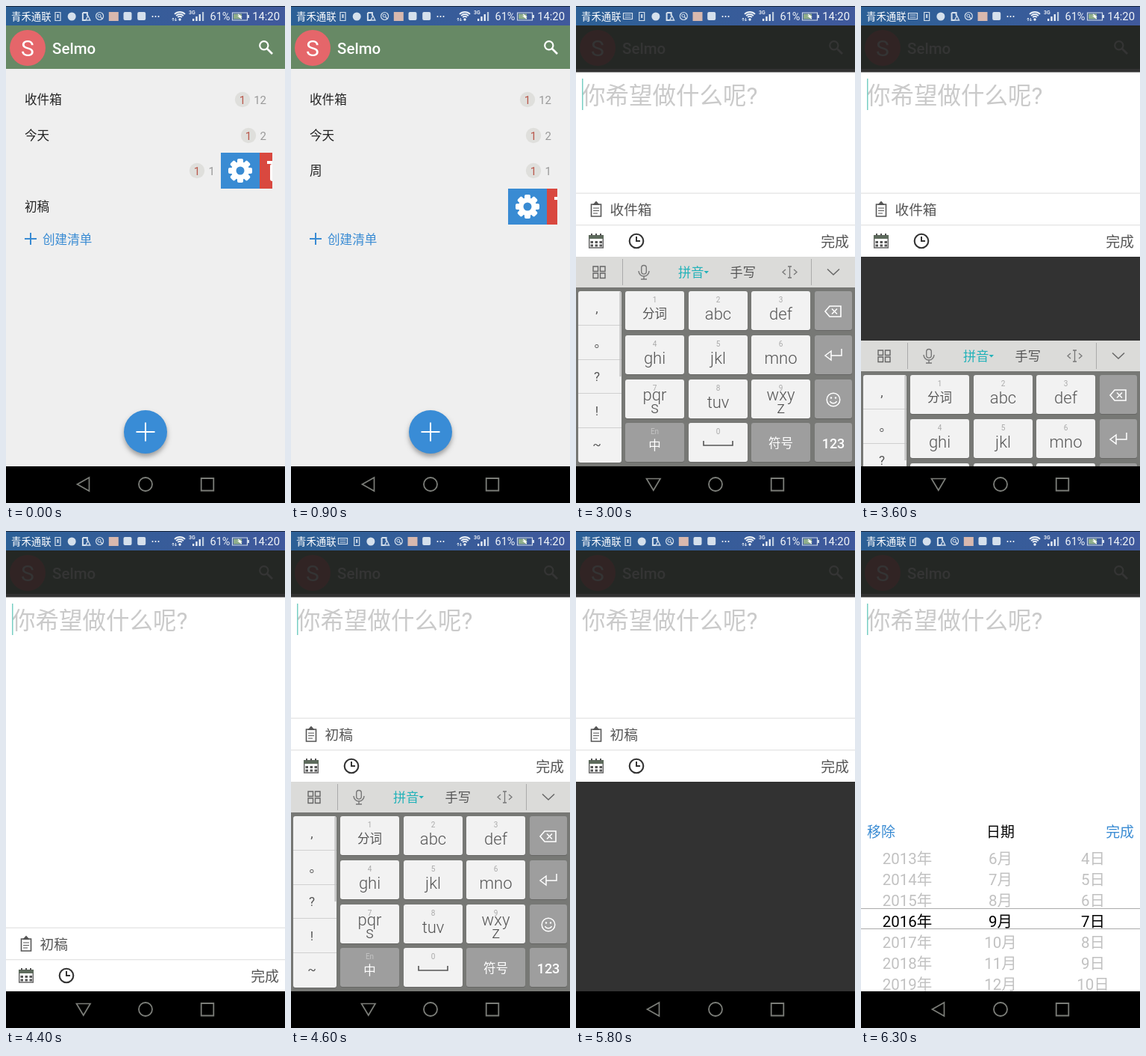
An HTML page with a canvas that plays this animation: 374 px wide and 664 px high, repeating every 6.4 s.

```html
<!DOCTYPE html>
<html lang="zh-CN">
<head>
<meta charset="utf-8">
<style>
html, body { margin: 0; width: 100%; height: 100%; overflow: hidden; background: #000; }
canvas { display: block; }
</style>
</head>
<body>
<canvas id="stage" width="374" height="664"></canvas>
<script>
const c = document.getElementById('stage').getContext('2d');
const LOOP = 6400, STEP = 100, BOTTOM = 615, KEYS_TOP = 335;
const FONT = 'Roboto, "Noto Sans CJK SC", "Noto Sans CJK", sans-serif';
const BLUE = '#398bd3', INK = '#555';

// Each track is a list of [time, value]; the value holds until the next time.
const tracks = {
  weekSwipe: [[0, 69], [100, 22], [200, 0]],
  draftSwipe: [[0, 0], [400, 45], [500, 88], [600, 104], [900, 66], [1000, 20], [1100, 0]],
  press: [[0, 0], [2100, .5], [2200, 1], [2500, 0]],
  shade: [[0, 0], [2400, .5], [2500, 1]],
  card: [[0, 0], [2500, BOTTOM], [2600, KEYS_TOP], [3800, BOTTOM], [4500, KEYS_TOP], [5900, BOTTOM]],
  keys: [[0, 0], [2600, .5], [2700, 1], [3600, .6], [3700, 0], [4500, .5], [4600, 1],
         [5700, .6], [5800, 0]],
  typing: [[0, 0], [2500, 1], [3700, 0], [4400, 1], [5800, 0]],
  lists: [[0, 0], [3800, 1], [4300, .5], [4400, 0]],
  dates: [[0, 0], [5900, .5], [6000, 1]],
  caret: [[0, 0], [3000, 1], [3300, 0], [3500, 1], [3700, 0], [4400, 1], [5100, 0],
          [5400, 1], [5800, 0], [5900, 1]],
  traffic: [[0, 1], [1400, 0], [1500, 1], [6300, 0]]
};
const valueAt = (track, t) => track.filter(k => k[0] <= t).pop()[1];

function text(s, x, y, size, color, align = 'left', weight = 400) {
  c.font = `${weight} ${size}px ${FONT}`;
  c.textAlign = align;
  c.fillStyle = color;
  c.fillText(s, x, y + size * .37);
}
function rect(x, y, w, h, color) {
  c.fillStyle = color;
  c.fillRect(x, y, w, h);
}
function rounded(x, y, w, h, r, color) {
  c.beginPath();
  c.roundRect(x, y, w, h, r);
  c.fillStyle = color;
  c.fill();
}
function disc(x, y, r, color) {
  c.beginPath();
  c.arc(x, y, r, 0, Math.PI * 2);
  c.fillStyle = color;
  c.fill();
}
function line(path, color, width = 1.5) {
  c.strokeStyle = color;
  c.lineWidth = width;
  c.stroke(new Path2D(path));
}
function ring(x, y, r, color, width) {
  line(`M${x - r} ${y}a${r} ${r} 0 1 1 ${2 * r} 0a${r} ${r} 0 1 1 ${-2 * r} 0z`, color, width);
}
function plus(x, y, r, color) {
  line(`M${x - r} ${y}h${2 * r}M${x} ${y - r}v${2 * r}`, color, 2);
}
function clipped(x, y, w, h, draw) {
  c.save();
  c.beginPath();
  c.rect(x, y, w, h);
  c.clip();
  draw();
  c.restore();
}

const pale = '#d5e0ec';
const statusIcons = [
  x => { line(`M${x - 3.5} 8.5h7v11h-7z`, pale, 1.2); line(`M${x} 11v5`, pale, 2); },
  x => disc(x, 14, 5.5, pale),
  x => { line(`M${x - 4} 9h6v4M${x - 4} 9v10h4`, pale, 2); line(`M${x} 19l3-6l3 6z`, pale, 1.3); },
  x => { ring(x, 13.5, 5, pale, 1.2); ring(x - .5, 13, 2, pale, 1); line(`M${x + 1} 14.5l3 3`, pale, 1.2); },
  x => rect(x - 6.5, 8, 13, 12, '#d8b8ae'),
  x => rounded(x - 5.5, 8, 11, 11, 2, pale),
  x => rounded(x - 5.5, 8, 11, 11, 2, pale)
];
function keyboardIcon(x) {
  line(`M${x - 6} 9.5h12v8h-12z`, pale, 1.2);
  line(`M${x - 4} 12h8M${x - 4} 15h8`, pale, 1);
}

function statusBar(s) {
  const sky = c.createLinearGradient(0, 0, 374, 0);
  sky.addColorStop(0, '#2c6096');
  sky.addColorStop(1, '#40599c');
  rect(0, 0, 374, 26, sky);
  rect(0, 0, 374, 1, '#16263c');
  text('青禾通联', 7, 14, 13.4, '#fff', 'left', 500);
  const icons = s.keys > 0 ? [keyboardIcon, ...statusIcons.slice(0, 6)] : statusIcons;
  icons.forEach((icon, i) => icon(69.5 + i * 18.7));
  for (let i = 0; i < 3; i++) disc(196.5 + i * 4, 14, 1, '#fff');
  for (let r = 4; r <= 10; r += 3) {
    c.beginPath();
    c.arc(233, 18, r, -2.35, -.79);
    c.strokeStyle = '#eef3f8';
    c.lineWidth = 1.8;
    c.stroke();
  }
  disc(233, 18, 1.7, '#eef3f8');
  if (s.traffic) line('M224 20v-4m-1.5 1.5l1.5-1.5l1.5 1.5M227.5 16v4m-1.5-1.5l1.5 1.5l1.5-1.5', pale, 1);
  text('3G', 245, 8, 7, '#fff', 'left', 500);
  for (let i = 0; i < 4; i++) rect(250 + i * 4.3, 17 - i * 3, 2.3, 3 + i * 3, i < 3 ? '#eef3f8' : '#b9c9db');
  text('61%', 273.5, 14, 14.5, '#f0f4f8');
  line('M303.5 9h20v10h-20z', pale, 1.2);
  rect(305, 10.5, 11, 7, '#8fae8a');
  rect(324, 12, 2, 4, pale);
  line('M311 11l4 3h-3l4 3', '#fff', 1.3);
  text('14:20', 367, 14, 14.8, '#f0f4f8', 'right');
}

function header() {
  rect(0, 26, 374, 58, '#678965');
  disc(29, 56, 24, '#e5666a');
  text('S', 29, 56, 30, '#fff', 'center');
  text('Selmo', 62, 56.5, 20.5, '#fff', 'left', 500);
  ring(345.8, 52.8, 5.6, '#fff', 2.2);
  line('M350 57l7 7', '#fff', 2.6);
}

function gear(x, y) {
  c.save();
  c.translate(x, y);
  for (let i = 0; i < 8; i++) {
    c.rotate(Math.PI / 4);
    rounded(-4, -16, 8, 9, 2, '#fff');
  }
  c.restore();
  disc(x, y, 12, '#fff');
  disc(x, y, 5.5, BLUE);
}
function trash(x, y) {
  rect(x - 16, y - 13, 32, 4, '#fff');
  rect(x - 5, y - 16, 10, 3, '#fff');
  rounded(x - 12, y - 9, 24, 23, 3, '#fff');
  for (const dx of [-6, 0, 6]) rect(x + dx - 1, y - 5, 2, 15, '#d9483f');
}

function listRow(name, y, total, swipe = 0) {
  clipped(23, y - 24, 334, 48, () => {
    const edge = 357 - swipe;
    text(name, 25 - swipe, y, 16.6, '#222');
    if (total) {
      const badge = (total > 9 ? 317 : 325) - swipe;
      disc(badge, y, 10.2, '#dfdfdc');
      text('1', badge, y, 15, '#b9584c', 'center');
      text(total, 349 - swipe, y, 15, '#999', 'right');
    }
    if (!swipe) return;
    rect(edge, y - 24, 52, 48, BLUE);
    rect(edge + 52, y - 24, 52, 48, '#d9483f');
    gear(edge + 26, y);
    trash(edge + 78, y);
  });
}

function home(s) {
  rect(0, 84, 374, BOTTOM - 84, '#efefef');
  header();
  listRow('收件箱', 125, 12);
  listRow('今天', 173, 2);
  listRow('周', 220, 1, s.weekSwipe);
  listRow('初稿', 268, 0, s.draftSwipe);
  plus(33, 311, 8, BLUE);
  text('创建清单', 49, 312, 16.6, BLUE);
  c.save();
  c.shadowColor = 'rgba(0,0,0,.35)';
  c.shadowBlur = 6;
  c.shadowOffsetY = 4;
  disc(187, 569, 29, `rgb(${57 - 5 * s.press},${140 - 8 * s.press},${214 - 14 * s.press})`);
  c.restore();
  plus(187, 569, 12.5, '#fff');
}

function shade(amount) {
  if (amount === 1) {
    rect(0, 84, 374, BOTTOM - 84, '#efefef');
    header();
  }
  rect(0, 26, 374, BOTTOM - 26, `rgba(28,28,28,${.895 * amount})`);
}

function cardTools(bottom, list) {
  rect(0, bottom - 85.5, 374, 1.3, '#e4e4e4');
  rect(0, bottom - 43, 374, 1.3, '#e4e4e4');
  const y = bottom - 63;
  line(`M20.5 ${y - 7}h13v16h-13z`, INK, 1.6);
  c.fillStyle = INK;
  c.fill(new Path2D(`M22 ${y - 6}l5-5.5l5 5.5z`));
  line(`M23 ${y - 2}h8m-8 3.5h8m-8 3.5h6`, INK, 1.2);
  text(list, 45.5, y, 18.7, INK);
  const d = bottom - 21;
  line(`M17.7 ${d - 7}h18.6v16h-18.6z`, '#666', 1.5);
  rect(17, d - 8, 20, 5, '#5d6a5c');
  for (const x of [20, 26, 32]) {
    rect(x, d - 10, 2, 3, INK);
    rect(x - .5, d, 3.5, 3, INK);
    rect(x - .5, d + 4.5, 3.5, 3, INK);
  }
  ring(81, d, 9.3, '#333', 2.1);
  line(`M81 ${d - 6}v6h5`, '#333', 2);
  text('完成', 366, d + 1, 18.9, INK, 'right');
}

function listPicker() {
  ['收件箱', '初稿'].forEach((name, i) => {
    const y = 551 + i * 43 - 21;
    rect(0, y - 21.5, 374, 1.3, '#e4e4e4');
    text(name, 45.5, y, 18.7, INK);
  });
}

function datePicker() {
  text('移除', 8, 402, 18.9, BLUE);
  text('日期', 187, 402, 18.9, '#000', 'center');
  text('完成', 366, 402, 18.9, BLUE, 'right');
  for (let i = -3; i <= 3; i++) {
    const y = 521 + i * 28, color = i ? '#c1c1c1' : '#000';
    text(`${2016 + i}年`, 62, y, 20.5, color, 'center');
    text(`${9 + i}月`, 187, y, 20.5, color, 'center');
    text(`${7 + i}日`, 311, y, 20.5, color, 'center');
  }
  rect(0, 504, 374, 1, '#aaa');
  rect(0, 531, 374, 1, '#aaa');
}

function card(s, t) {
  rect(0, 88.5, 374, s.card - 88.5, '#fff');
  text('你希望做什么呢?', 8, 119.5, 31.5, '#cacaca');
  if (s.caret) rect(8, 97, 1.5, 42, '#79cfc4');
  const picker = s.lists ? listPicker : s.dates ? datePicker : null;
  if (!picker) return cardTools(s.card, t < 4300 ? '收件箱' : '初稿');
  clipped(0, 140, 374, BOTTOM - 140, () => {
    c.translate(0, (1 - (s.lists || s.dates)) * 230);
    picker();
  });
}

function key(col, row, label, hint, dark) {
  const x = Math.round(66 + col * 84.7), y = Math.round(381 + row * 58.8);
  const w = col === 3 ? 50 : 79, mid = x + w / 2, latin = /[a-z]/.test(label);
  rounded(x, y + 1, w, 52, 3, '#666664');
  rounded(x, y, w, 52, 3, dark ? '#9e9e9e' : '#f2f2f2');
  if (hint) text(hint, mid, y + 11, 10, dark ? '#c4c4c4' : '#aaa', 'center');
  const [first, second] = label.split('/');
  const size = latin ? 22 : /\d/.test(label) ? 18 : 16.5;
  const color = dark ? '#fff' : INK, weight = latin ? 300 : 500;
  text(first, mid, y + (second ? 20 : hint ? 30 : 27), size, color, 'center', weight);
  if (second) text(second, mid, y + 37, size, color, 'center', weight);
}

function keyboard() {
  rect(0, 335, 374, 41, '#dbdbd9');
  for (const x of [23, 32.5]) for (const y of [348, 357]) line(`M${x} ${y}h6.5v6.5h-6.5z`, '#666', 1.4);
  rect(62, 338, 1, 35, '#aaa');
  rect(315, 338, 1, 35, '#aaa');
  line('M91 346.5a3.3 3.3 0 0 1 3.3 3.3v5a3.3 3.3 0 0 1-6.6 0v-5a3.3 3.3 0 0 1 3.3-3.3zM84 354a7 7 0 0 0 14 0M91 361v4m-4 0h8', '#777', 1.4);
  text('拼音', 137, 355.5, 17.2, '#22b2b9', 'left', 500);
  c.fillStyle = '#22b2b9';
  c.fill(new Path2D('M171.5 354h6.5l-3.2 3.5z'));
  text('手写', 206.5, 355.5, 17.2, INK);
  line('M284 348h5m-2.5 0v15m-2.5 0h5M281 352l-4 3.5l4 3.5M292 352l4 3.5l-4 3.5', '#777', 1.3);
  line('M337 351.5l8 7.5l8-7.5', '#666', 1.5);

  rect(0, 376, 374, BOTTOM - 376, '#777875');
  rounded(3, 382, 58, 229, 3, '#666664');
  rounded(3, 381, 58, 229, 3, '#f2f2f2');
  [',', '。', '?', '!', '~'].forEach((mark, i) => {
    text(mark, mark === '。' ? 33 : 28, 404 + i * 45.5, 17, INK, 'center');
    if (i) rect(3, Math.round(380.5 + i * 45.6), 58, 1, '#d0d0d0');
  });
  rect(58.5, 382, 2, 113, '#bdbdbd');

  ['分词', 'abc', 'def', 'ghi', 'jkl', 'mno', 'pqr/s', 'tuv', 'wxy/z'].forEach((label, i) =>
    key(i % 3, Math.floor(i / 3), label, String(i + 1)));
  key(0, 3, '中', 'En', true);
  key(1, 3, '', '0');
  key(2, 3, '符号', '', true);
  for (let row = 0; row < 4; row++) key(3, row, row === 3 ? '123' : '', '', true);
  line('M171 581v6h39v-6', INK, 1.6);
  line('M334 408l6-7h15v14h-15zM343 404.5l7 7m0-7l-7 7', '#fff', 1.6);
  line('M342 461l-8 6l8 6zM342 467h14v-9', '#fff', 1.5);
  ring(345, 526, 8.8, '#fff', 1.5);
  disc(342, 523.5, 1.2, '#fff');
  disc(348, 523.5, 1.2, '#fff');
  line('M340.5 528a5 5 0 0 0 9 0', '#fff', 1.4);
}

function navBar(typing) {
  const gray = '#7b7d78';
  rect(0, BOTTOM, 374, 49, '#000');
  line(typing ? 'M94.5 631.5h18.5l-9.2 15.5z' : 'M95.5 639l16-9v18z', gray, 1.7);
  ring(187, 639, 9, gray, 1.8);
  line('M261.7 631h16.6v16.5h-16.6z', gray, 1.8);
}

function draw() {
  const t = Math.floor(performance.now() % LOOP / STEP) * STEP;
  const s = {};
  for (const name in tracks) s[name] = valueAt(tracks[name], t);
  if (s.shade < 1) home(s);
  if (s.shade) shade(s.shade);
  if (s.card) card(s, t);
  if (s.keys) clipped(0, KEYS_TOP, 374, BOTTOM - KEYS_TOP, () => {
    c.translate(0, (1 - s.keys) * (BOTTOM - KEYS_TOP));
    keyboard();
  });
  statusBar(s);
  navBar(s.typing);
  requestAnimationFrame(draw);
}
draw();
</script>
</body>
</html>
```
